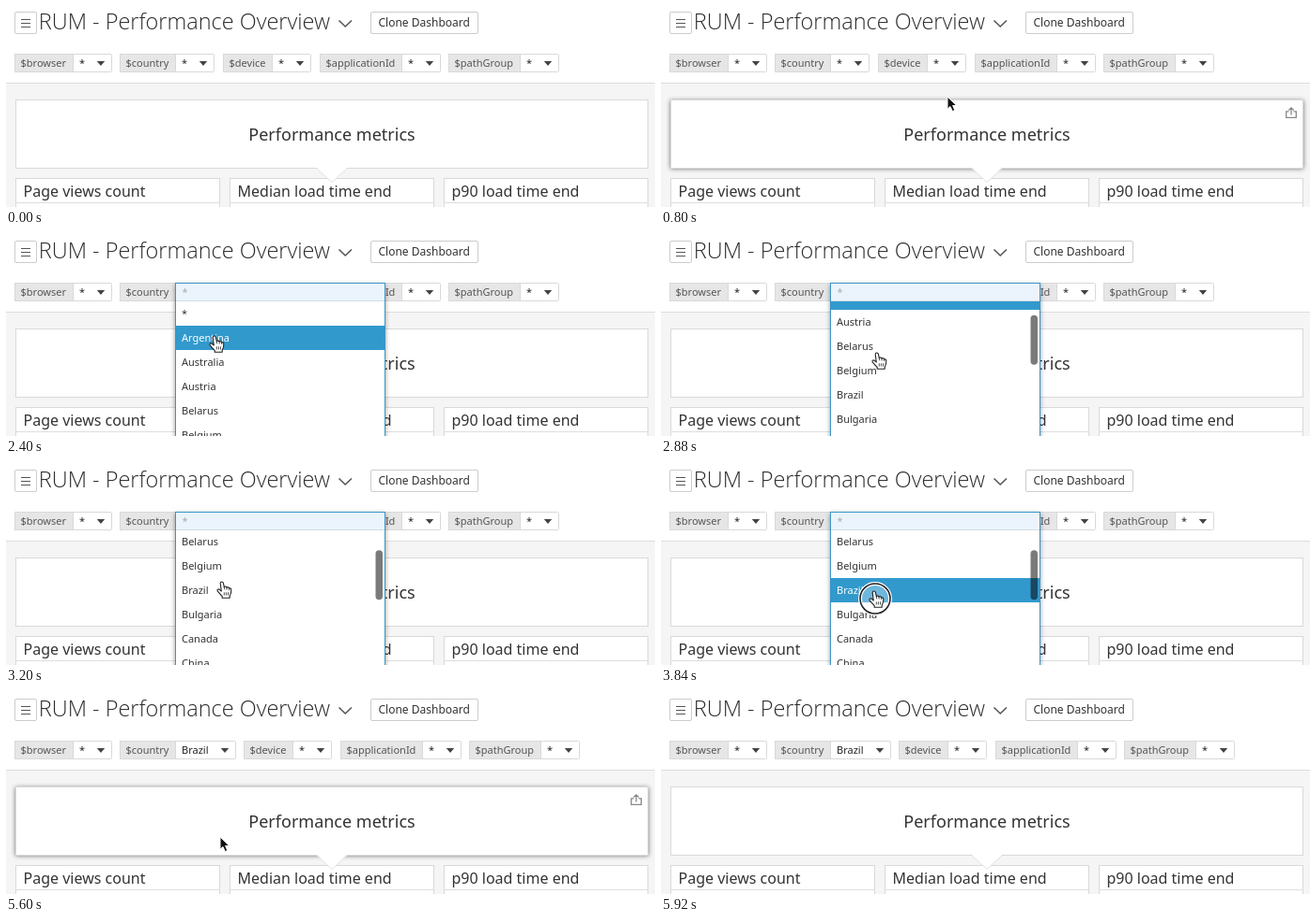
Write an HTML page that moves like this. It is 691 by 215 pixels and loops after 6.4 s.

```html
<!DOCTYPE html>
<html lang="en">
<head>
<meta charset="utf-8">
<title>Performance dashboard</title>
<style>
html, body { margin: 0; width: 100%; height: 100%; overflow: hidden; background: #fff; }
svg { display: block; width: 691px; height: 215px; font-family: "Noto Sans", "Open Sans", sans-serif; fill: #333; }
.title { font: 300 23.5px "Open Sans", "Noto Sans", sans-serif; fill: #2b2b2b; }
.big { font-size: 18px; }
.mid { font-size: 16px; }
.btn { font-size: 12px; }
.small { font-size: 11px; }
.box { fill: #fff; stroke: #d9d9d9; }
.line { fill: none; stroke: #555; }
</style>
</head>
<body>
<svg id="stage" viewBox="0 0 691 215">
  <defs>
    <filter id="glow" x="-20%" y="-30%" width="140%" height="160%"><feGaussianBlur stdDeviation="2.6"/></filter>
    <clipPath id="listClip"><rect x="181" y="71" width="222" height="144"/></clipPath>
  </defs>
  <rect width="691" height="215" fill="#fff"/>
  <rect y="82" width="691" height="133" fill="#f5f5f5"/>
  <path d="M0 82.5H691" stroke="#dcdcdc"/>

  <rect class="box" x="9.5" y="6.5" width="23" height="23" rx="1.5" style="stroke:#ccc"/>
  <path class="line" d="M16 14.5H26M16 18.5H26M16 22.5H26" stroke-width="1.2"/>
  <text class="title" x="34.8" y="25">RUM - Performance Overview</text>
  <path class="line" d="M354.5 15.5L361.2 22L368 15.5" stroke-width="1.6"/>
  <rect class="box" x="388.5" y="6.5" width="114" height="23" rx="1.5" style="stroke:#ccc"/>
  <text class="btn" x="396.5" y="22">Clone Dashboard</text>
  <g id="chips" class="small"></g>

  <g id="widgets" class="mid"></g>
  <rect id="shadow" x="10" y="101" width="674" height="73" fill="#000" fill-opacity=".55" filter="url(#glow)"/>
  <rect class="box" x="10.5" y="100.5" width="673" height="73"/>
  <path d="M331 173L347 188.5L363 173Z" fill="#fff"/>
  <path d="M331 174L347 188.5L363 174" fill="none" stroke="#e4e4e4"/>
  <text class="big" x="347" y="144" text-anchor="middle">Performance metrics</text>
  <g id="share" fill="none" stroke="#888" stroke-width="1.3">
    <path d="M668.5 112.8H665.7V119.4H676.3V112.8H673.5M671 116.5V109.2M668.3 111.5L671 108.8L673.7 111.5"/>
  </g>

  <g id="drop">
    <rect id="dropShadow" x="180" y="53" width="224" fill="#000" fill-opacity=".4" filter="url(#glow)"/>
    <rect id="dropBox" x="180.5" y="51.5" width="223" fill="#fff" stroke="#3a94c6"/>
    <rect x="181" y="52" width="222" height="18" fill="#ebf4fc"/>
    <path d="M181 70.5H403" stroke="#d3dde5"/>
    <text class="small" x="187.5" y="65" style="fill:#aaa">*</text>
    <path id="caret" d="M187.5 55V69" stroke="#222"/>
    <g id="spinner" fill="none" stroke-width="2.4">
      <circle cx="291" cy="82" r="5.8" stroke="#c9c9c9"/>
      <path id="arc" d="M285.2 82A5.8 5.8 0 0 1 291 76.2" stroke="#444"/>
    </g>
    <g id="list" class="small" clip-path="url(#listClip)">
      <g id="rows"><rect id="mark" x="181" width="222" height="26" fill="#3299cd"/></g>
      <rect id="thumb" x="393.5" width="7.5" height="53" rx="3.75" fill="#000" fill-opacity=".52"/>
    </g>
  </g>

  <g id="cursor">
    <circle id="ringOut" cx="1" cy="8" r="16" fill="#fff" fill-opacity=".3" stroke="#fff" stroke-width="4"/>
    <circle id="ringIn" cx="1" cy="8" r="16" fill="none" stroke="#222" stroke-width="1.6"/>
    <path id="arrow" d="M0 0V13.2L3 10.5L5.3 15.6L7.8 14.5L5.6 9.5H9.8Z" fill="#111" stroke="#fff" stroke-width="1"/>
    <g id="hand" stroke="#222" stroke-width="1.1" stroke-linejoin="round">
      <path d="M-1.8 1.5C-1.8 -.3 1 -.5 1.4 1.4L2.3 5.6C3.2 4.7 4.8 5 5 6.2C6 5.4 7.4 5.9 7.6 7C8.7 6.5 9.7 7.2 9.8 8.4C10 11.3 9.3 13.4 8.2 15V17.3H.2V15.5C-1.3 14.2 -3 12 -4.8 9.8C-5.7 8.4 -4 7.3 -2.7 8.3L-.7 10Z" fill="#fff"/>
      <path d="M2.3 5.6L2.7 8.3M5 6.2L5.2 8.6M7.6 7V9M2.3 11.3V14.5M4.4 11.3V14.5M6.5 11.3V14.5" fill="none" stroke-width=".8"/>
    </g>
  </g>
</svg>
<script>
const LOOP = 6400, STEP = 160, ROW = 26, LIST_TOP = 71;
const $ = id => document.getElementById(id);
const show = (id, on) => $(id).setAttribute("visibility", on ? "inherit" : "hidden");
const set = (id, name, value) => $(id).setAttribute(name, value);

const countries = ["*", "Argentina", "Australia", "Austria", "Belarus", "Belgium",
  "Brazil", "Bulgaria", "Canada", "China", "Colombia"];

// name, left edge, label width
const filters = [["$browser", 9, 62], ["$country", 121, 59], ["$device", 231, 52],
  ["$applicationId", 334, 87], ["$pathGroup", 471, 76]];

// time, x, y of the pointer tip
const path = [[160, 418, 152], [320, 402, 146], [480, 375, 132], [640, 340, 113], [800, 305, 97],
  [960, 246, 76], [1120, 206, 59], [2080, 206, 59], [2240, 211, 76], [2400, 222, 108],
  [2560, 230, 126], [3200, 230, 126], [3520, 227, 136], [3840, 227, 136], [4000, 226, 137],
  [5440, 226, 137], [5600, 228, 154], [5760, 232, 190], [5920, 236, 225]];
const scrolls = [[2720, 0], [2880, 69], [3040, 94], [3200, 105]];

function track(keys, t) {
  if (t <= keys[0][0]) return keys[0].slice(1);
  for (let i = 1; i < keys.length; i++) {
    const a = keys[i - 1], b = keys[i];
    if (t <= b[0]) {
      const k = (t - a[0]) / (b[0] - a[0]);
      return a.slice(1).map((v, j) => v + (b[j + 1] - v) * k);
    }
  }
  return keys[keys.length - 1].slice(1);
}

function drawChips(chosen) {
  $("chips").innerHTML = filters.map(([name, left, label], i) => {
    const x = left + (chosen && i > 1 ? 22 : 0);
    const picked = chosen && i === 1;
    const width = label + (picked ? 64 : 41);
    const c = x + width - 11;
    return `<rect class="box" x="${x + .5}" y="51.5" width="${width}" height="19" rx="1"/>
      <rect x="${x + .5}" y="51.5" width="${label}" height="19" fill="#e6e6e6" stroke="#d9d9d9"/>
      <text x="${x + 6.5}" y="65" style="fill:#555">${name}</text>
      <text x="${x + label + 7}" y="65" style="fill:#222">${picked ? "Brazil" : "*"}</text>
      <path d="M${c - 4.2} 59H${c + 4.2}L${c} 64Z" fill="#444"/>`;
  }).join("");
}

$("widgets").innerHTML = ["Page views count", "Median load time end", "p90 load time end"].map((name, i) => {
  const x = 10 + 228 * i;
  return `<rect class="box" x="${x + .5}" y="184.5" width="217" height="40"/>
    <path d="M${x} 210.5H${x + 218}" stroke="#dedede"/>
    <text x="${x + 8.5}" y="204">${name}</text>`;
}).join("");

$("rows").insertAdjacentHTML("beforeend", countries.map((name, i) =>
  `<text class="row" x="187" y="${LIST_TOP + ROW * i + 17}">${name}</text>`).join(""));
const rows = [...document.querySelectorAll(".row")];

let lastChosen = null;

function draw(t) {
  const open = t >= 1440 && t < 4000;
  const loaded = t >= 1920;
  const chosen = t >= 4000;
  if (chosen !== lastChosen) drawChips(lastChosen = chosen);

  const hover = (t >= 160 && t < 960) || (t >= 4000 && t < 5760) ? 1 : t === 5760 ? .4 : 0;
  set("shadow", "opacity", hover);
  set("share", "opacity", hover);

  show("drop", open);
  if (open) {
    const height = loaded ? 180 : 42;
    set("dropBox", "height", height);
    set("dropShadow", "height", height);
    show("caret", t < 2240);
    show("spinner", !loaded);
    set("arc", "transform", `rotate(${(t - 1760) * .5} 291 82)`);
    show("list", loaded);
    const [scroll] = track(scrolls, t);
    const active = t < 2400 ? 0 : t < 2560 ? 1 : t < 3360 ? 2 : 6;
    set("rows", "transform", `translate(0 ${-scroll})`);
    set("mark", "y", LIST_TOP + ROW * active);
    rows.forEach((row, i) => row.style.fill = i === active ? "#fff" : "#333");
    show("thumb", loaded && t >= 2880);
    set("thumb", "y", 73 + scroll * .183);
  }

  const [x, y] = track(path, t);
  const hand = t >= 1120 && t < 4000;
  const click = t === 1280 || t === 1440 || t === 3680 || t === 3840;
  show("cursor", t >= 160 && t < 5920);
  set("cursor", "transform", `translate(${x} ${y})`);
  show("hand", hand);
  show("arrow", !hand);
  for (const id of ["ringOut", "ringIn"]) {
    show(id, click);
    set(id, "r", t === 3680 || t === 1280 ? 13 : 16);
  }
}

const start = performance.now();
function tick() {
  const t = (performance.now() - start) % LOOP;
  draw(Math.floor(t / STEP) * STEP);
  requestAnimationFrame(tick);
}
tick();
</script>
</body>
</html>
```
